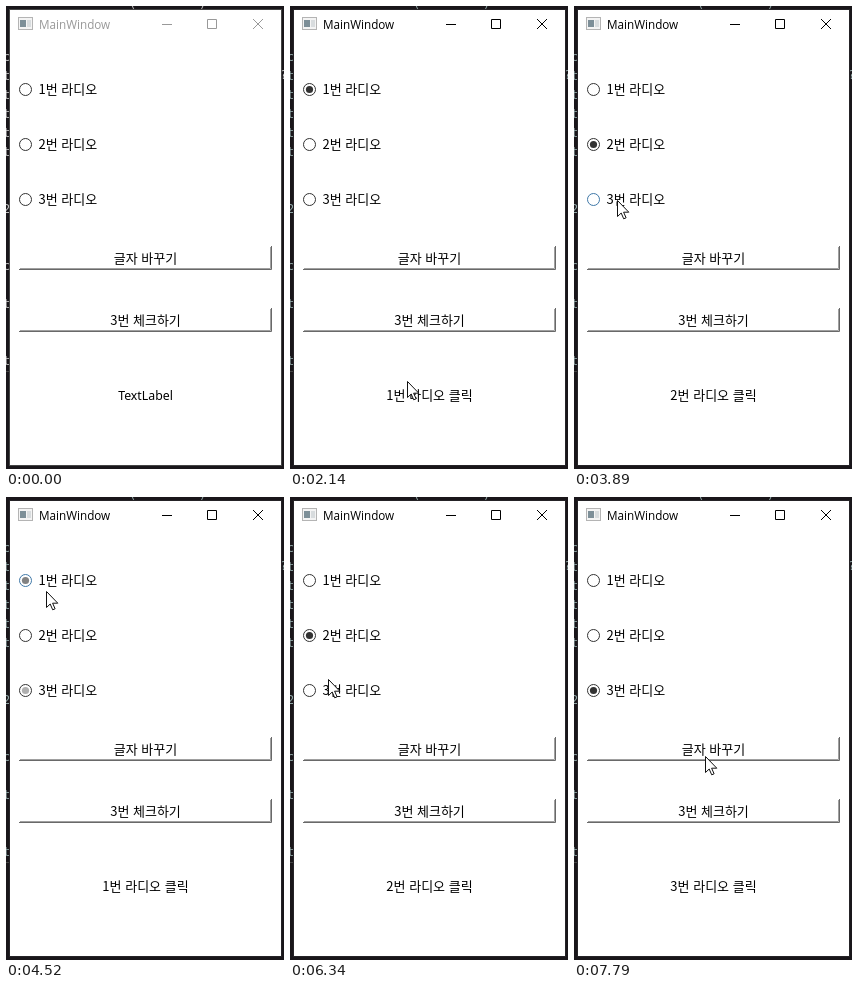
Animation of 278x463 px, one loop 7.99 s. Source, as an HTML page:

```html
<!DOCTYPE html>
<html lang="ko">
<head>
<meta charset="utf-8">
<style>
  html, body { margin: 0; width: 100%; height: 100%; overflow: hidden; background: #19161a; }
  svg { display: block; }
  text { font: 13px "Noto Sans CJK KR", "Noto Sans CJK", sans-serif; fill: #000; }
  .mid { text-anchor: middle; }
  .latin { font: 12.3px "Noto Sans", sans-serif; }
  .title { font: 11.7px "Open Sans", sans-serif; fill: currentColor; }
  #backdrop text { font: 12px "DejaVu Sans Mono", monospace; fill: currentColor; }
</style>
</head>
<body>
<svg width="278" height="463" viewBox="0 0 278 463">
  <rect width="278" height="463" fill="#19161a"/>
  <g id="backdrop"></g>
  <rect id="frame" x="3.5" y="3.5" width="272" height="456" fill="#fff"/>
  <g id="bar">
    <rect x="12.5" y="11.5" width="14" height="12" fill="#f4f4f4" stroke="#b4b4b4"/>
    <rect x="14" y="14" width="6" height="7" fill="#7d8f98"/>
    <rect x="21" y="14" width="4" height="7" fill="#d8dcde"/>
    <text class="title" x="33" y="22.5">MainWindow</text>
    <path d="M156 18.5h10M201.5 13.5h9v9h-9zM247 13l10 10M257 13l-10 10" fill="none" stroke="currentColor"/>
  </g>
  <g id="widgets"></g>
  <text id="label" x="139.5" y="394"></text>
  <path id="cursor" d="M.5.5v16l3.7-3.5 2.5 5.8 2.4-1-2.5-5.6h5.2z" fill="#fff" stroke="#111"/>
</svg>
<script>
const LOOP = 7990, ACTIVE = 270;
const TRAVEL = 450, REST = 120, PRESS = 80, FADE = 230, HOVER_DELAY = 100;
const $ = id => document.getElementById(id);
const rowY = i => 83.5 + 55 * i;

// The pointer rests at each stop; a stop with a radio ends in a click.
const rest = (at, x, y) => ({ at, x, y });
const press = (at, radio, x = 40, y = rowY(radio)) => ({ at, x, y, radio });
const stops = [
  rest(ACTIVE, 150, 463), rest(950, 110, 66), press(1300, 0),
  rest(1790, 117, 375), rest(2620, 57, 124), press(2900, 1),
  press(3890, 2, 43, 194), press(4300, 0), press(4780, 1),
  press(5240, 0, 55, 87), press(5950, 1),
  rest(6340, 38, 182), press(6850, 2), rest(7790, 131, 259)
];
const clicks = stops.filter(s => 'radio' in s);

// One character per line of the editor behind the window.
$('backdrop').innerHTML =
  [...'cttttt  2  c t  t'].map((c, i) => `<text x="-3" y="${55 + 19 * i}">${c}</text>`).join('') +
  '<text x="274" y="73">?</text><text x="123" y="2">(</text><text x="193" y="2">)</text>' +
  '<path d="M0 365.5h4" stroke="#444"/>';

const radio = (_, i) => `
  <circle class="ring" cx="19.5" cy="${rowY(i)}" r="6" fill="#fff"/>
  <circle class="dot" cx="19.5" cy="${rowY(i)}" r="3.6" fill="#333"/>
  <text x="32.5" y="${rowY(i) + 4.5}">${i + 1}번 라디오</text>`;
const button = (y, caption) => `
  <path d="M14 ${y + 22.5}h250.5v-21.5" fill="none" stroke="#a0a0a0"/>
  <path d="M13 ${y + 23.5}h252.5v-23.5" fill="none" stroke="#696969"/>
  <text class="mid" x="139.5" y="${y + 16.5}">${caption}</text>`;
$('widgets').innerHTML = Array.from({ length: 3 }, radio).join('') +
  button(240, '글자 바꾸기') + button(302, '3번 체크하기');

const rings = document.querySelectorAll('.ring');
const dots = document.querySelectorAll('.dot');

function pointer(t) {
  const next = stops.findIndex(s => s.at > t);
  const to = stops.at(next), from = stops[next - 1] || to;
  const leave = Math.max(from.at + REST, to.at - TRAVEL);
  const p = Math.min(1, Math.max(0, (t - leave) / (to.at - leave)));
  const ease = p * p * (3 - 2 * p);
  return ['x', 'y'].map(k => Math.round(from[k] + (to[k] - from[k]) * ease));
}

function draw(t) {
  const active = t >= ACTIVE;
  $('bar').style.color = active ? '#000' : '#999';
  $('backdrop').style.color = active ? '#8fa5a5' : '#c0c0c0';
  $('frame').style.stroke = active ? '#252327' : '#444';

  const [latest, previous] = clicks.filter(c => c.at + PRESS <= t).reverse();
  const fade = latest ? Math.min(1, (t - latest.at - PRESS) / FADE) : 0;
  const [hoverX, hoverY] = pointer(t - HOVER_DELAY);
  rings.forEach((ring, i) => {
    const hovered = hoverX < 90 && Math.abs(hoverY - rowY(i)) < 15;
    ring.style.stroke = hovered ? '#3f78a8' : '#333';
    dots[i].style.opacity = i === latest?.radio ? fade : i === previous?.radio ? 1 - fade : 0;
  });

  $('label').textContent = latest ? `${latest.radio + 1}번 라디오 클릭` : 'TextLabel';
  $('label').setAttribute('class', latest ? 'mid' : 'mid latin');
  $('cursor').setAttribute('transform', `translate(${pointer(t)})`);
}

const start = performance.now();
function tick() {
  draw((performance.now() - start) % LOOP);
  requestAnimationFrame(tick);
}
tick();
</script>
</body>
</html>
```
